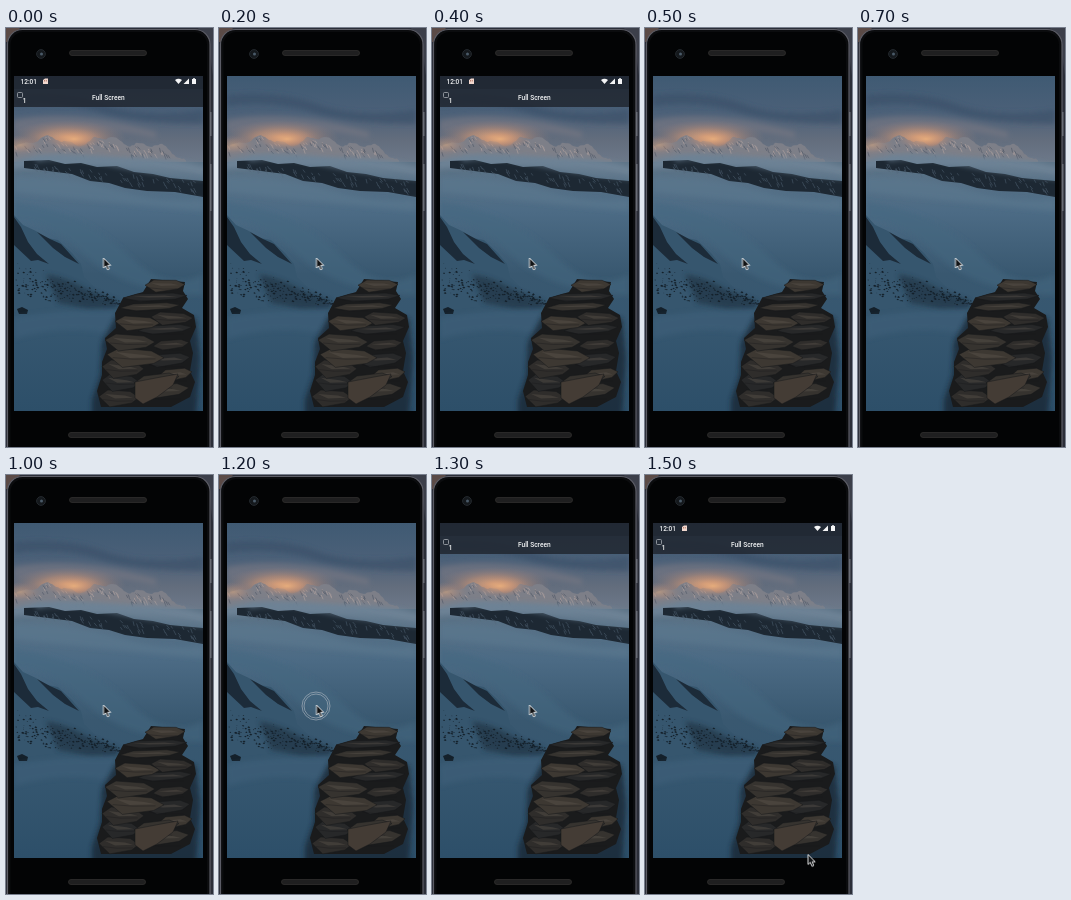
Recreate the animation shown at these times as an HTML page. Size 207 by 419 pixels, loop 1600 ms.

```html
<!DOCTYPE html>
<html lang="en">
<head>
<meta charset="utf-8">
<title>Full Screen</title>
<style>
html, body { margin: 0; width: 100%; height: 100%; overflow: hidden; background: #20232b; }
svg { display: block; width: 207px; height: 419px; }
text { font-family: Roboto, sans-serif; fill: #f4f5f6; }
.bar, .status, .ring, .cursor { animation: 1600ms step-end infinite; }
.bar { animation-name: bar; }
.status { animation-name: status; }
.ring { animation-name: ring; }
.cursor { animation-name: cursor; }
/* Status icons return one step after the title bar */
@keyframes bar {
  0%, 18.75%, 50%, 81.25%, 100% { opacity: 1; }
  6.25%, 31.25%, 62.5% { opacity: 0; }
}
@keyframes status {
  0%, 25%, 56.25%, 87.5%, 100% { opacity: 1; }
  6.25%, 31.25%, 62.5% { opacity: 0; }
}
@keyframes ring {
  0%, 62.5%, 81.25%, 100% { opacity: 0; }
  56.25%, 75% { opacity: .75; }
}
@keyframes cursor {
  0% { transform: translate(97.5px, 230px); }
  93.75%, 100% { transform: translate(163px, 379.5px); }
}
</style>
</head>
<body>
<svg viewBox="0 0 207 419">
  <defs>
    <linearGradient id="sky" x1="0" y1="0" x2="0" y2="1">
      <stop offset="0" stop-color="#3f5a73"/>
      <stop offset=".4" stop-color="#4b6078"/>
      <stop offset=".7" stop-color="#636d7d"/>
      <stop offset="1" stop-color="#6f7c8d"/>
    </linearGradient>
    <linearGradient id="mist" x1="0" y1="0" x2="0" y2="1">
      <stop offset="0" stop-color="#5d7386"/>
      <stop offset=".2" stop-color="#4c6b85"/>
      <stop offset=".45" stop-color="#395870"/>
      <stop offset=".65" stop-color="#365770"/>
      <stop offset="1" stop-color="#2d4f69"/>
    </linearGradient>
    <radialGradient id="glow">
      <stop offset="0" stop-color="#e8ad7c" stop-opacity=".95"/>
      <stop offset=".45" stop-color="#cc9576" stop-opacity=".6"/>
      <stop offset="1" stop-color="#977f7d" stop-opacity="0"/>
    </radialGradient>
    <filter id="soft" x="-30%" y="-60%" width="160%" height="220%"><feGaussianBlur stdDeviation="2.6"/></filter>
    <filter id="fine"><feGaussianBlur stdDeviation=".5"/></filter>
    <clipPath id="screen"><path d="M8 48H197V383H8Z"/></clipPath>
  </defs>

  <!-- desktop and phone body -->
  <path d="M0 0H207V419H0Z" fill="#2b2e38"/>
  <path d="M0 0H14L3 14H0Z" fill="#5b4b47"/>
  <path d="M192 0H207V48L203 20Z" fill="#3c3f4a"/>
  <rect x="1.5" y="1.5" width="202.5" height="440" rx="15" fill="#0b0c0e" stroke="#5c5d66" stroke-width="1.2"/>
  <rect x="4.5" y="4" width="196.5" height="436" rx="13" fill="#030405"/>
  <path d="M204 84h1.5v24h-1.5zM204 136h1.5v47h-1.5z" fill="#6a6d76"/>
  <circle cx="35" cy="26" r="4.4" fill="#14181c" stroke="#23282d"/>
  <circle cx="35.5" cy="26" r="1.5" fill="#4a5a68"/>
  <g fill="#1f1f20" stroke="#302f2e" stroke-width=".8">
    <rect x="63.5" y="22.5" width="77" height="5" rx="2.5"/>
    <rect x="62.5" y="404.5" width="77" height="5" rx="2.5"/>
  </g>

  <!-- landscape -->
  <g clip-path="url(#screen)">
    <path d="M8 47H197V140H8Z" fill="url(#sky)"/>
    <g filter="url(#soft)">
      <path d="M8 67Q62 62 98 76T197 82V96Q130 96 92 84T8 78Z" fill="#3a5069" opacity=".65"/>
      <path d="M8 92Q70 80 150 104L150 110Q80 96 8 104Z" fill="#7d7b83" opacity=".55"/>
    </g>
    <ellipse cx="62" cy="109" rx="58" ry="17" fill="url(#glow)"/>
    <path id="peaks" fill="#7d7f88" filter="url(#fine)"/>
    <g id="snow" stroke="#b5a5a1" stroke-width="1" opacity=".6"></g>
    <g id="crags" stroke="#46505f" stroke-width=".9" opacity=".6"></g>
    <ellipse cx="68" cy="111" rx="30" ry="11" fill="url(#glow)"/>
    <ellipse cx="14" cy="117" rx="22" ry="10" fill="url(#glow)" opacity=".5"/>
    <path d="M8 134H197V383H8Z" fill="url(#mist)"/>
    <path d="M5 133Q30 125 65 127T137 130T200 139V148Q141 137 82 138T5 141Z" fill="#6d8295" filter="url(#soft)"/>
    <path d="M18 133L43 132L59 136L75 135L91 139L111 138L128 144L147 146L164 150L197 153V169L169 164L141 163L119 160L103 155L84 153L66 146L18 140Z" fill="#1d2833" filter="url(#fine)"/>
    <g id="ridge" stroke="#56697a" stroke-width=".8" opacity=".6"></g>
    <g filter="url(#soft)">
      <path d="M30 128Q100 126 150 139T200 148V152Q140 146 100 137T30 134Z" fill="#6d8295" opacity=".6"/>
      <path d="M8 149Q63 148 111 162T197 171V183Q116 176 8 164Z" fill="#5c7990" opacity=".6"/>
      <path d="M8 174Q77 183 120 225T197 246V267Q115 263 79 227T8 192Z" fill="#456680" opacity=".55"/>
    </g>
    <path d="M8 187L17 197L30 203L41 210L52 212L66 225L75 236L78 249L92 263L113 272L112 281L59 284L8 288Z" fill="#36566e" filter="url(#fine)"/>
    <path d="M8 189L15 199L22 214L31 226L43 236L32 232L25 233L8 217ZM31 204L44 211L55 216L73 236L59 229L47 220Z" fill="#1c2b39" filter="url(#fine)"/>
    <path d="M40 246Q62 250 82 262L112 273V280L84 281L52 275Z" fill="#1d2e3c" opacity=".6" filter="url(#soft)"/>
    <g id="scree" fill="#14202a"></g>
    <path d="M8 290Q48 281 112 283L104 306Q57 296 8 311Z" fill="#3f617a" opacity=".55" filter="url(#soft)"/>

    <!-- cairn -->
    <path d="M110 288L96 314L94 348L86 372V390H190L194 330L190 290Z" fill="#15222d" opacity=".7" filter="url(#soft)"/>
    <path d="M117 270L137 264L145 251L179 254L177 263L182 271L176 280L188 287L190 299L184 313L187 325L184 343L189 354L184 369L165 379H95L91 363L96 347L96 334L101 321L99 310L110 300L109 285Z" fill="#1a1b1c"/>
    <g id="stones" stroke="#17191a" stroke-width=".5"></g>
  </g>

  <!-- app bar -->
  <g class="bar">
    <path d="M8 48H197V79H8Z" fill="#1f242c" opacity=".8"/>
    <path d="M8 48H197V61H8Z" fill="#1a212a" opacity=".35"/>
    <text x="102.3" y="72" font-size="6.6" font-weight="500" text-anchor="middle">Full Screen</text>
    <rect x="11.5" y="64.5" width="5" height="5" rx="1" fill="none" stroke="#a8adb3" stroke-width=".8"/>
    <text x="16.5" y="75" font-size="7" font-weight="500">1</text>
  </g>
  <g class="status">
    <text x="14.5" y="56" font-size="6.5" font-weight="500">12:01</text>
    <path d="M37 52L39 50.5H42V56H37Z" fill="#f1d8ce"/>
    <path d="M38.5 52V53.5M40.3 52V53.5" stroke="#a35b48" stroke-width=".7"/>
    <g fill="#f4f5f6">
      <path d="M169 52Q172.5 49.5 176 52L172.5 56Z"/>
      <path d="M183 50.5V56H177.5Z"/>
      <path d="M186 51H187V50.3H189V51H190V56H186Z"/>
    </g>
  </g>

  <g class="ring" fill="none" stroke="#b4bcc4" stroke-width=".8">
    <circle cx="97" cy="231" r="14"/>
    <circle cx="97" cy="231" r="12"/>
  </g>
  <path class="cursor" d="M0 0V10L2.3 8L4 11.8L5.8 11L4.2 7.3H7.2Z" fill="#111315" stroke="#f2f3f4" stroke-width=".9"/>
</svg>
<script>
let seed = 17;
const rand = () => (seed = seed * 16807 % 2147483647) / 2147483647;
const spread = () => rand() + rand() - 1;
const draw = (parent, d, attrs = {}) => {
  const path = document.createElementNS('http://www.w3.org/2000/svg', 'path');
  path.setAttribute('d', d);
  for (const key in attrs) path.setAttribute(key, attrs[key]);
  document.getElementById(parent).append(path);
};

// Far peaks, lower to the right, with snow and rock streaks below the crest
const crest = x => 113 + 4 * Math.sin(x / 9) + 2 * Math.sin(x / 3.7) + Math.max(0, x - 130) * .35;
let skyline = 'M8 140';
for (let x = 8; x <= 180; x += 2) skyline += `L${x} ${crest(x) + spread()}`;
document.getElementById('peaks').setAttribute('d', skyline + 'V140Z');
const streak = (parent, x, y) => draw(parent, `M${x} ${y}l${1 + rand() * 2} ${2 + rand() * 3}`);
for (let i = 0; i < 90; i++) {
  const x = 8 + rand() * 156;
  streak(i % 2 ? 'snow' : 'crags', x, crest(x) + 1 + rand() * 9);
}

// Snow gullies on the dark ridge
for (let i = 0; i < 60; i++) {
  const x = 24 + rand() * 170;
  streak('ridge', x, 132 + x * .11 + rand() * (4 + x * .04));
}

// Loose rocks, thickest along the foot of the slope
for (let i = 0; i < 210; i++) {
  const x = 9 + rand() * 103;
  const y = 250 + x * .21 + spread() * (24 - x * .18);
  const w = .6 + rand() * 2;
  draw('scree', `M${x} ${y}l${w * .6} ${-w * .45}l${w * .6} ${w * .5}l${-w * .5} ${w * .3}Z`);
}
draw('scree', 'M11 281l5 -2l6 3l-1 4l-8 0Z');

// Flat stones stacked from the ground up: x, y, width, height, tilt
const stones = [
  [93, 362, 40, 16, 5], [128, 358, 55, 19, -8], [96, 346, 38, 15, 8],
  [152, 342, 34, 16, -6], [96, 332, 42, 16, 8], [128, 348, 45, 18, -10],
  [139, 327, 45, 17, -6], [101, 320, 57, 16, 10], [147, 313, 36, 13, -5],
  [99, 306, 50, 15, 7], [132, 298, 54, 12, -5], [109, 288, 45, 13, 6],
  [145, 284, 42, 12, 5], [114, 276, 60, 10, -4], [117, 266, 64, 10, -3],
  [139, 252, 40, 13, 1]
];
const tones = ['#2f2d2b', '#36332f', '#272829', '#3d3832'];
stones.forEach(([x, y, w, h, t], i) => {
  draw('stones', `M${x} ${y + h * .4}l${w * .22} ${-h * .4}l${w * .56} ${t * .3}l${w * .22} ${h * .3 + t * .2}l${-w * .18} ${h * .35}l${-w * .55} ${h * .25}Z`,
    { fill: tones[i % 4] });
  draw('stones', `M${x + w * .15} ${y + h * .25}l${w * .5} ${t * .3}l${w * .2} ${h * .14}l${-w * .45} ${h * .04}Z`,
    { fill: '#5c564e', opacity: .4, stroke: 'none' });
  draw('stones', `M${x + w * .1} ${y + h * .6}l${w * .35} ${h * .1}l${w * .4} ${-h * .02}`,
    { fill: 'none', opacity: .7 });
});
draw('stones', 'M129 354L155 349L172 346L167 357L151 369L137 376L129 370Z', { fill: '#443c35' });
</script>
</body>
</html>
```
